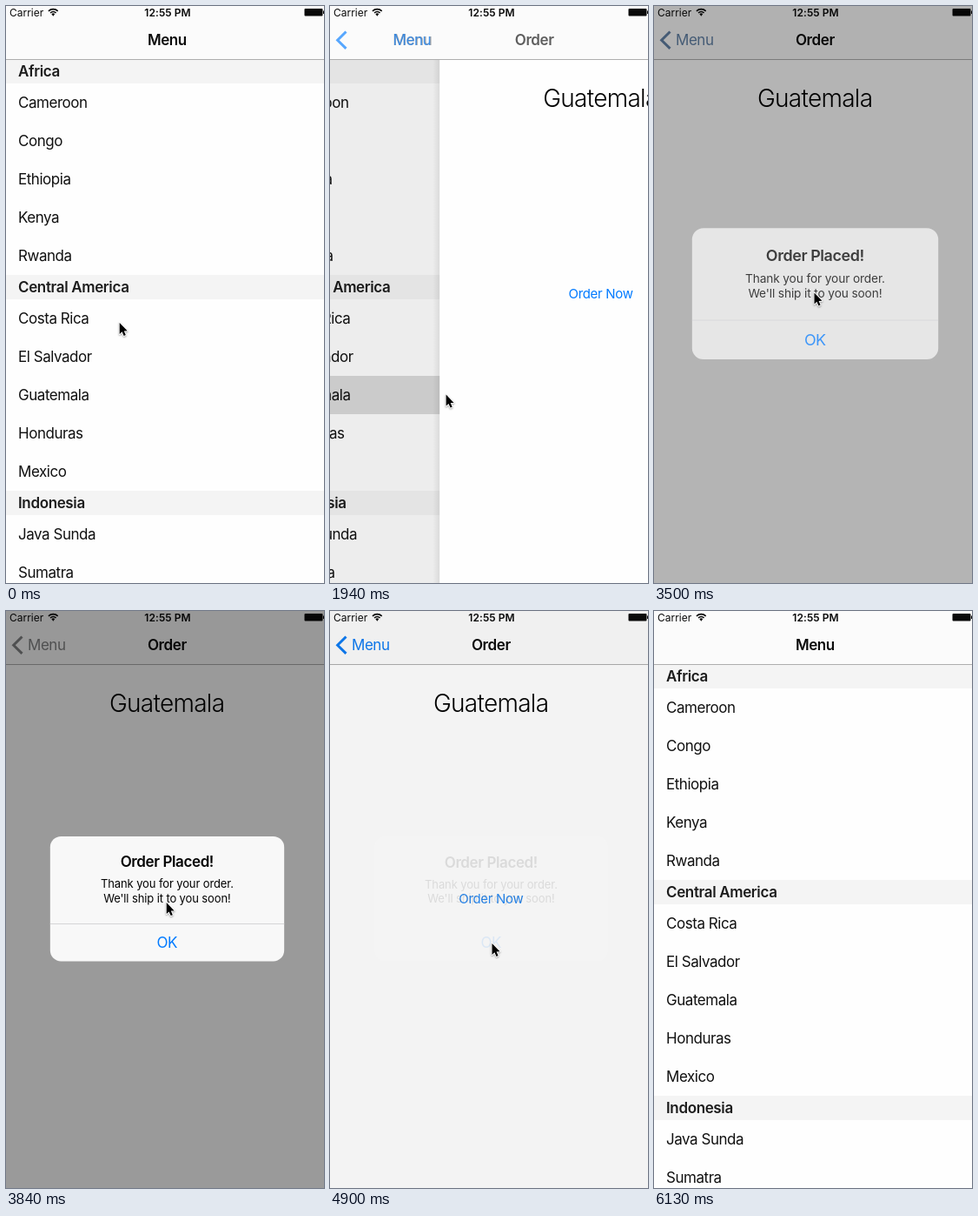
Write an HTML page with a canvas that moves like this. It is 366 px wide and 663 px high and loops after 6570 ms.

```html
<!DOCTYPE html>
<html lang="en">
<head>
<meta charset="utf-8">
<title>Order flow</title>
<style>
html, body { margin: 0; width: 100%; height: 100%; overflow: hidden; background: #fefefe; }
canvas { display: block; width: 366px; height: 663px; }
</style>
</head>
<body>
<canvas id="stage"></canvas>
<script>
const W = 366, H = 663, LOOP = 6570, NAV = 61, MID = 185.5;
const PAGE = '#fefefe', BLUE = [0, 122, 255], GREY = [132, 132, 132];
const canvas = document.getElementById('stage');
const ctx = canvas.getContext('2d');
const dpr = window.devicePixelRatio || 1;
canvas.width = W * dpr;
canvas.height = H * dpr;

const sections = [
  ['Africa', ['Cameroon', 'Congo', 'Ethiopia', 'Kenya', 'Rwanda']],
  ['Central America', ['Costa Rica', 'El Salvador', 'Guatemala', 'Honduras', 'Mexico']],
  ['Indonesia', ['Java Sunda', 'Sumatra']]
];

// Bursts of screen updates: first, last, count
const bursts = [
  [800, 1400, 8], [1490, 1490, 1], [1760, 2370, 8], [2460, 3070, 8], [3150, 3760, 8],
  [3840, 4460, 8], [4640, 4990, 5], [5160, 5780, 8], [5860, 6130, 4]
];

// Pointer path: time, x, y, ease-out power
const path = [
  [0, 130.7, 364, 1], [720, 130.7, 364, 1], [1490, 131.5, 448, 1.8], [1760, 131.5, 448, 1],
  [2370, 139, 443, 1], [3150, 184.5, 329.5, 1.8], [3800, 184.5, 329.5, 1],
  [4460, 186.5, 382, 1.8], [5160, 186.5, 382, 1], [5780, 200, 398, 1],
  [5950, 255, 500, 1], [6040, 334, 640, 1], [6130, 400, 760, 1], [LOOP, 400, 760, 1]
];

const clamp = v => Math.min(1, Math.max(0, v));
const mix = (a, b, u) => a + (b - a) * u;
const smooth = u => u * u * (3 - 2 * u);
const rgb = (a, b, u) => `rgb(${a.map((v, i) => Math.round(mix(v, b[i], u))).join(',')})`;

function spring(ms, rate) {
  if (ms <= 0) return 0;
  const x = ms * rate / 1000;
  return x > 7.5 ? 1 : 1 - (1 + x) * Math.exp(-x);
}

function snap(t) {
  let shown = 0;
  for (const [from, to, n] of bursts) {
    for (let i = 0; i < n; i++) {
      const at = Math.floor((from + (n > 1 ? (to - from) * i / (n - 1) : 0)) / 10) * 10;
      if (at <= t) shown = at;
    }
  }
  return shown;
}

function pointerAt(t) {
  const i = Math.max(1, path.findIndex(k => k[0] >= t));
  const a = path[i - 1], b = path[i];
  const u = 1 - Math.pow(1 - clamp((t - a[0]) / (b[0] - a[0])), b[3]);
  return [mix(a[1], b[1], u), mix(a[2], b[2], u)];
}

function text(str, x, y, { size = 17, weight = 400, space = -0.46, color = '#0a0a0a', center = false } = {}) {
  ctx.font = `${weight} ${size}px Inter, Roboto, sans-serif`;
  ctx.letterSpacing = space + 'px';
  ctx.fillStyle = color;
  if (center) x -= (ctx.measureText(str).width - space) / 2;
  ctx.fillText(str, x, y);
}

function box(x, y, w, h, color) {
  ctx.fillStyle = color;
  ctx.fillRect(x, y, w, h);
}

function faded(alpha, draw) {
  if (alpha <= 0) return;
  ctx.save();
  ctx.globalAlpha *= alpha;
  draw();
  ctx.restore();
}

function drawList(shift, highlight) {
  ctx.save();
  ctx.translate(shift, 0);
  box(0, NAV, W, H, PAGE);
  let y = NAV;
  for (const [name, rows] of sections) {
    box(0, y, W, 28, '#f4f4f4');
    text(name, 14, y + 20.3, { weight: 600, space: -0.36, color: '#1c1c1c' });
    y += 28;
    for (const row of rows) {
      if (row === 'Guatemala') faded(highlight, () => box(0, y, W, 44, '#d9d9d9'));
      text(row, 14, y + 28, { color: '#111' });
      y += 44;
    }
  }
  ctx.restore();
}

function drawDetail(x, tint, buttonAlpha) {
  ctx.save();
  ctx.translate(x, 0);
  if (x > 0) {
    const g = ctx.createLinearGradient(-8, 0, 0, 0);
    g.addColorStop(0, 'rgba(0,0,0,0)');
    g.addColorStop(1, 'rgba(0,0,0,.08)');
    box(-8, NAV, 8, H, g);
  }
  box(0, NAV, W, H, PAGE);
  text('Guatemala', MID, 116, { size: 28, weight: 300, space: -0.7, color: '#000', center: true });
  faded(buttonAlpha, () => text('Order Now', MID, 336, { size: 15, space: -0.3, color: tint, center: true }));
  ctx.restore();
}

function drawStatus() {
  text('Carrier', 4, 11.5, { size: 12, space: 0 });
  text('12:55 PM', 186, 11.5, { size: 12, weight: 600, space: 0.05, center: true });
  ctx.strokeStyle = ctx.fillStyle = '#0a0a0a';
  ctx.lineWidth = 1.6;
  for (const r of [4.6, 7.6]) {
    ctx.beginPath();
    ctx.arc(54.3, 11.2, r, -Math.PI * 0.75, -Math.PI * 0.25);
    ctx.stroke();
  }
  ctx.beginPath();
  ctx.moveTo(54.3, 11.8);
  ctx.arc(54.3, 11.2, 2.7, -Math.PI * 0.75, -Math.PI * 0.25);
  ctx.fill();
  ctx.beginPath();
  ctx.roundRect(343.5, 3, 21, 8.5, 1);
  ctx.fill();
  box(365, 5.5, 1, 3.5, '#0a0a0a');
}

function drawNav(p, tint) {
  box(0, 0, W, NAV, '#fbfbfb');
  box(0, NAV, W, 1, '#aeaeae');
  drawStatus();
  const menuX = mix(163, 25, p);
  faded(1 - p, () => text('Menu', menuX, 45, { weight: 600 }));
  faded(p, () => {
    text('Menu', menuX, 45, { color: tint });
    text('Order', mix(330, MID, p), 45, { weight: 600, space: -0.4, center: true });
    ctx.strokeStyle = tint;
    ctx.lineWidth = 3;
    ctx.beginPath();
    ctx.moveTo(18.5, 29.5);
    ctx.lineTo(8.7, 39.2);
    ctx.lineTo(18.5, 48.9);
    ctx.stroke();
  });
}

function drawAlert(scale, divider) {
  ctx.translate(MID, 331);
  ctx.scale(scale, scale);
  ctx.translate(-MID, -331);
  ctx.fillStyle = '#f9f9f9';
  ctx.beginPath();
  ctx.roundRect(51, 259, 269, 143.3, 12.5);
  ctx.fill();
  if (divider) box(51, 359, 269, 1, '#d4d4d6');
  text('Order Placed!', MID, 294.5, { weight: 600, space: -0.4, color: '#000', center: true });
  const small = { size: 13, space: -0.12, color: '#000', center: true };
  text('Thank you for your order.', MID, 318.5, small);
  text("We'll ship it to you soon!", MID, 334.5, small);
  text('OK', MID, 387.3, { color: '#007aff', center: true });
}

function drawPointer(x, y) {
  const shape = [[0, 0], [0, 13], [2.9, 10.3], [5, 15], [7.1, 14.1], [5.1, 9.5], [9, 9.3]];
  ctx.save();
  ctx.translate(x, y);
  ctx.beginPath();
  shape.forEach(([px, py]) => ctx.lineTo(px, py));
  ctx.closePath();
  ctx.lineJoin = 'round';
  ctx.shadowColor = 'rgba(0,0,0,.35)';
  ctx.shadowBlur = 2 * dpr;
  ctx.shadowOffsetY = dpr;
  ctx.strokeStyle = '#fff';
  ctx.lineWidth = 1.8;
  ctx.stroke();
  ctx.shadowColor = 'transparent';
  ctx.fillStyle = '#000';
  ctx.fill();
  ctx.restore();
}

function draw(t) {
  const popping = t >= 5160;
  const page = popping ? 1 - spring(t - 5150, 16) : spring(t - 1790, 16);
  const closing = t >= 4640;
  const alert = closing ? 1 - smooth(clamp((t - 4700) / 250)) : spring(t - 3290, 13);
  const tint = rgb(BLUE, GREY, alert);
  const pressed = t >= 3150 && !closing;
  const highlight = popping ? page : t >= 1760 ? 1 : 0;

  ctx.setTransform(dpr, 0, 0, dpr, 0, 0);
  ctx.globalAlpha = 1;
  box(0, 0, W, H, PAGE);
  if (page < 1) drawList(-110 * page, highlight);
  if (page > 0) {
    box(0, NAV, W, H, `rgba(0,0,0,${0.1 * page})`);
    drawDetail(W * (1 - page), tint, pressed ? 0.2 : 1);
  }
  drawNav(page, tint);
  if (alert > 0) {
    box(0, 0, W, H, `rgba(0,0,0,${0.4 * alert})`);
    faded(alert, () => drawAlert(closing ? 1 : mix(1.2, 1, alert), !closing));
  }
  drawPointer(...pointerAt(t));
}

const start = performance.now();
function tick() {
  draw(snap((performance.now() - start) % LOOP));
  requestAnimationFrame(tick);
}
tick();
</script>
</body>
</html>
```
